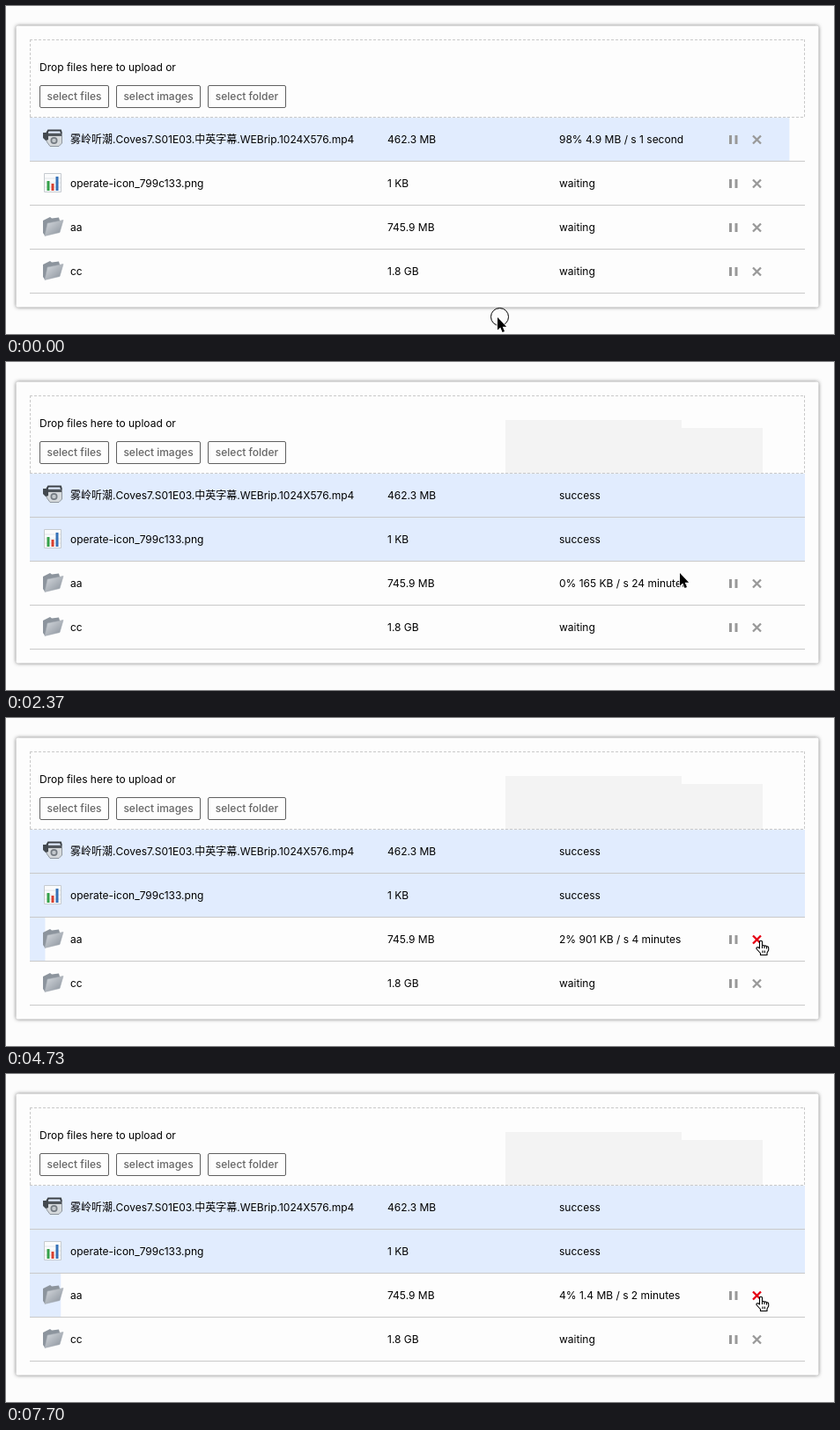
These frames come from a looping animation (940 px wide and 373 px high, 8000 ms). An HTML page:

```html
<!DOCTYPE html>
<html lang="zh-CN">
<head>
<meta charset="utf-8">
<title>File upload</title>
<style>
html, body { margin: 0; width: 100%; height: 100%; overflow: hidden; background: #fcfcfc; }
svg { display: block; font: 12px Inter, "Noto Sans CJK SC", "Noto Sans CJK", sans-serif; }
text { white-space: pre; }
.panel { fill: #fdfdfd; filter: drop-shadow(0 0 2px rgba(0, 0, 0, .55)); }
.button { fill: #fdfdfd; stroke: #606060; }
.label { fill: #666; font-weight: 500; text-anchor: middle; }
.line { stroke: #c9c9c9; fill: none; }
.fill { fill: #e1ecfe; }
.patch { fill: #f3f3f3; }
</style>
</head>
<body>
<svg width="940" height="373" viewBox="0 0 940 373">
  <defs>
    <linearGradient id="steel" x2="1" y2="1">
      <stop stop-color="#d9dde1"/><stop offset="1" stop-color="#868e98"/>
    </linearGradient>
    <g id="camera">
      <path d="M4 5L6 1.500H20L21 5" fill="none" stroke="#3c4146" stroke-width="2"/>
      <path d="M4 5H21.500V16L18 19.500H8L4 14Z" fill="#d5d9dc" stroke="#7b8288" stroke-width=".8"/>
      <path d="M0 4H6V12L3 13L0 10Z" fill="#43494f"/>
      <path d="M6 5H21V8H6Z" fill="#50565c"/>
      <circle cx="12.500" cy="13" r="4" fill="#747b82"/>
      <circle cx="12.500" cy="13" r="2.300" fill="#c4c9cd"/>
    </g>
    <g id="chart">
      <path d="M1.500 .5H20.500V21.500H1.500Z" fill="#fafbfc" stroke="#c6cbd0"/>
      <path d="M2 6H20M2 11H20M2 16H20" stroke="#e2e6e9"/>
      <path d="M4.500 9H7.500V20H4.500Z" fill="#35a14a"/>
      <path d="M9.500 12H12.500V20H9.500Z" fill="#d8402f"/>
      <path d="M14.500 4H17.500V20H14.500Z" fill="#3672b8"/>
    </g>
    <g id="folder">
      <path d="M0 4L8 0L10 1.500L18 .5L19 4V17L2 21L0 18Z" fill="#8c949d"/>
      <path d="M5 7L23 3.500L19 17.500L2 21.500Z" fill="url(#steel)" stroke="#a5acb4" stroke-width=".6"/>
    </g>
    <path id="pause" d="M821 247h3v10h-3ZM827.500 247h3v10h-3Z" fill="#999"/>
    <path id="cross" d="M848 247.500L857 256.500M857 247.500L848 256.500" stroke-width="2.300"/>
    <path id="arrow" d="M0 0V14.500L3.300 11.600L5.600 17L8 16L5.700 10.800H10.200Z" stroke="#fff" stroke-width="1.400" paint-order="stroke"/>
    <path id="hand" d="M-1.500 9V1.200Q0 -.8 1.500 1.200V6Q2.800 4.800 4 6.300Q5.500 5.300 6.500 6.800Q8.500 6.300 8.700 8.500V11L7 14V16.500H-.5V14.500L-5 9.500Q-5.300 7.300 -3 7.800Z M1.500 6V9M4 6.500V9M6.500 7V9.500M2 11.500V14M4.300 11.500V14" fill="#fff" stroke="#000" stroke-width="1.100" stroke-linejoin="round"/>
  </defs>
  <rect class="panel" x="11.500" y="22.500" width="911" height="320" rx="2"/>
  <g id="below"></g>
  <g id="fixed"></g>
  <g id="above"></g>
</svg>
<script>
const LOOP = 8000, STEP = 147.8, LEFT = 27, WIDTH = 880, ROW = 50;
const FOLDER_START = 1620, REPORT = 504, HOVER = 4700;

const layer = id => document.getElementById(id);
const clamp = p => Math.min(1, Math.max(0, p));
const rect = (cls, x, y, w, h, extra = "") =>
  `<rect class="${cls}" x="${x}" y="${y}" width="${w}" height="${h}" ${extra}/>`;
const text = (x, y, s, cls = "") => `<text class="${cls}" x="${x}" y="${y}">${s}</text>`;
const use = (id, x, y, extra = "") => `<use href="#${id}" x="${x}" y="${y}" ${extra}/>`;

// Linear interpolation through [position, ...values] keys.
function along(keys, at) {
  const i = keys.findIndex(key => key[0] > at);
  if (i == 0) return keys[0].slice(1);
  if (i < 0) return keys.at(-1).slice(1);
  const a = keys[i - 1], b = keys[i], p = (at - a[0]) / (b[0] - a[0]);
  return a.slice(1).map((v, k) => v + (b[k + 1] - v) * p);
}

const pointerPath = [
  [500, 558, 354], [1034, 585, 102], [1626, 575, 77], [1774, 568, 67], [1922, 572, 78],
  [2070, 572, 78], [2365, 765, 240], [3251, 850, 262], [3695, 865, 247], [4582, 866, 248]
];
const speedCurve = [[0, 0], [3, 494], [5, 788], [8, 1126], [12, 1434]];

const files = [
  { icon: "camera", name: "雾岭听潮.Coves7.S01E03.中英字幕.WEBrip.1024X576.mp4", size: "462.3 MB",
    status: t => t < 670 ? "98% 4.9 MB / s 1 second" : t < 1180 ? "100% 5.1 MB / s 0 second" : "success",
    percent: t => 98 + 2 * clamp((t - 670) / 600) },
  { icon: "chart", name: "operate-icon_799c133.png", size: "1 KB",
    status: t => t < 1470 ? "waiting" : "success",
    percent: t => 100 * clamp((t - 1010) / 600) },
  { icon: "folder", name: "aa", size: "745.9 MB", status: folderStatus, percent: folderPercent },
  { icon: "folder", name: "cc", size: "1.8 GB", status: () => "waiting", percent: () => 0 }
];

const reports = t => Math.floor((t - FOLDER_START) / REPORT);

function folderStatus(t) {
  const n = reports(t);
  if (n < 0) return "waiting";
  if (n == 0) return "0% 6 bytes / s 1 year";
  const [kb] = along(speedCurve, n);
  const speed = kb < 1024 ? `${Math.round(kb)} KB` : `${(kb / 1024).toFixed(1)} MB`;
  return `${Math.floor(n * .4)}% ${speed} / s ${Math.round(24 / n)} minutes`;
}

// The bar slides 600 ms towards each new whole percent.
function folderPercent(t) {
  let total = 0;
  for (let whole = 1; whole <= 4; whole++) {
    const changed = FOLDER_START + REPORT * Math.ceil(whole / .4);
    total += clamp((t - changed) / 600);
  }
  return total;
}

function patches(t) {
  const patch = (x, y, w) => rect("patch", x, y, w, 127 - y);
  return (t > 1030 && t < 1320 ? patch(73, 102, 827) : "") +
    (t > 1470 ? patch(573, 75, 286) : "") +
    (t > 1770 ? patch(567, 66, 200) : "");
}

function drawFixed() {
  const buttons = [[38, 79, "select files"], [125, 96, "select images"], [229, 89, "select folder"]];
  layer("fixed").innerHTML =
    '<path class="line" stroke-dasharray="3 2" d="M27 38.5H907M27 126.5H907M27.5 38V127M906.5 38V127"/>' +
    text(38, 74, "Drop files here to upload or") +
    buttons.map(([x, w, s]) =>
      rect("button", x + .5, 90.5, w - 1, 25, 'rx="1.5"') + text(x + w / 2, 107, s, "label")).join("") +
    files.map((file, i) => {
      const y = 156 + ROW * i;
      return `<path class="line" d="M${LEFT} ${y + 20.5}h${WIDTH}"/>` +
        use(file.icon, 42, y - 16) + text(73, y, file.name) + text(433, y, file.size);
    }).join("");
}

function draw(t) {
  const hover = t > HOVER;
  const [x, y] = hover ? [857, 253] : along(pointerPath, t);

  layer("below").innerHTML = patches(t) + files.map((file, i) =>
    rect("fill", LEFT, 127 + ROW * i, WIDTH * file.percent(t) / 100, 49)).join("");

  layer("above").innerHTML = files.map((file, i) => {
    const label = file.status(t), dy = ROW * (i - 2);
    const color = hover && i == 2 ? "#e60012" : "#999";
    return text(628, 256 + dy, label) + (label == "success" ? "" :
      use("pause", 0, dy) + use("cross", 0, dy, `stroke="${color}"`));
  }).join("") +
    (t < STEP ? '<circle cx="560.5" cy="353.5" r="10" fill="none" stroke="#000"/>' : "") +
    use(hover ? "hand" : "arrow", Math.round(x), Math.round(y));
}

function tick(now) {
  draw(Math.floor(now % LOOP / STEP) * STEP);
  requestAnimationFrame(tick);
}

drawFixed();
draw(0);
requestAnimationFrame(tick);
</script>
</body>
</html>
```
